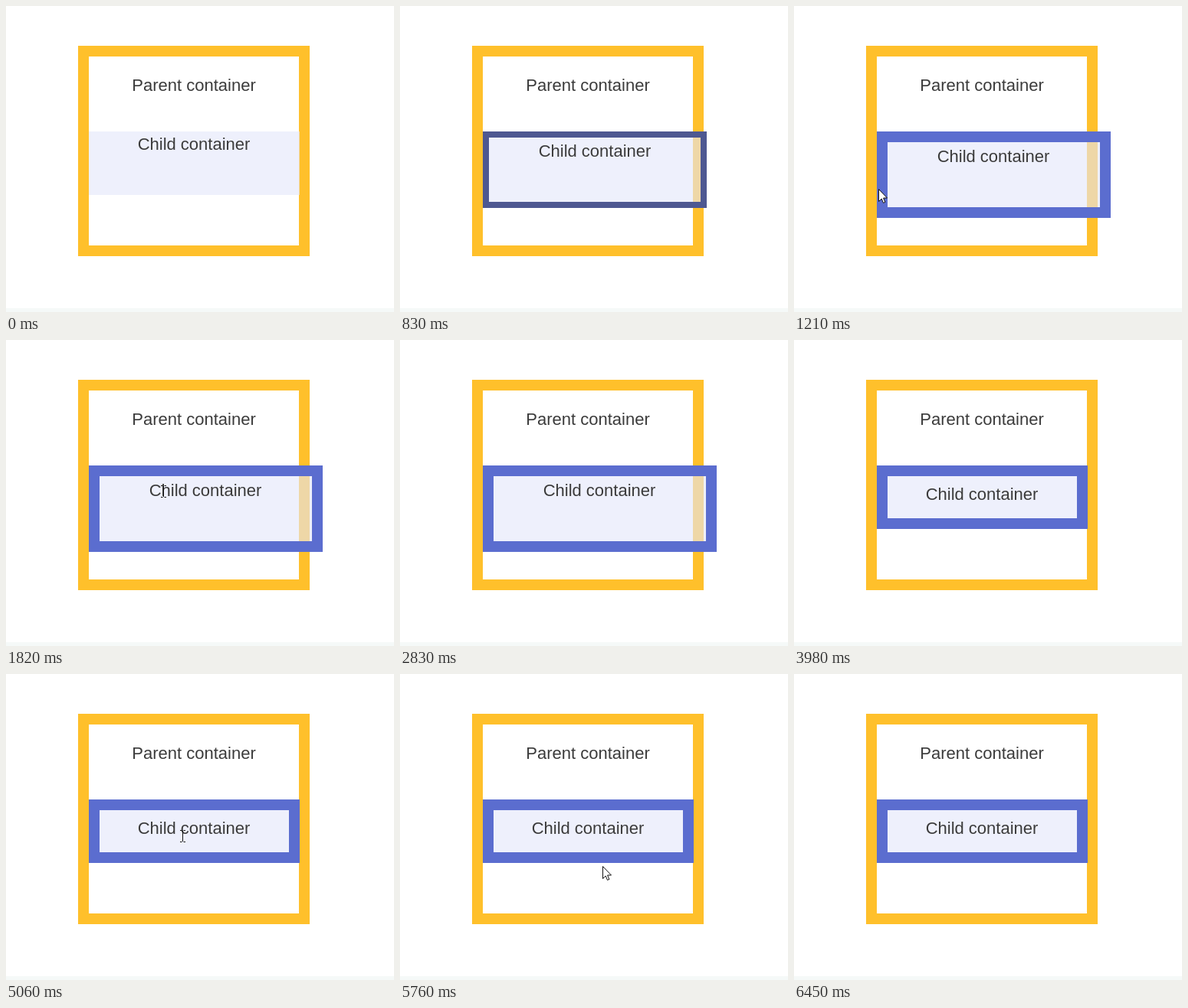
These frames come from a looping animation (506x400 px, 8.85 s). An HTML page with a canvas:

```html
<!DOCTYPE html>
<html lang="en">
<head>
<meta charset="utf-8">
<title>Box sizing</title>
<style>
  html, body { margin: 0; width: 100%; height: 100%; overflow: hidden; background: #fff; }
  canvas { display: block; }
</style>
</head>
<body>
<canvas id="stage" width="506" height="400"></canvas>
<script>
const ctx = document.getElementById('stage').getContext('2d');
const LOOP = 8850, TICK = 77, START = 664;
const GROWTH = [0.05, 0.25, 0.58, 1];
const INK = [59, 59, 59], BLUE = [91, 109, 207];

// Pointer paths: [tick, x, y]
const PATHS = [
  [[6, 36, 256], [10, 330, 186], [15, 205, 198], [17, 218, 200],
   [19, 240, 236], [21, 260, 199], [22, 260, 199], [27, 248, 373]],
  [[52, 50, 274], [57, 230, 212], [60, 298, 168], [63, 190, 200], [74, 463, 388]]
];
const ARROW = new Path2D('M.5 .5V16.5L4.2 13 6.5 18.4 8.9 17.4 6.6 12H11.5Z');
const BEAM = new Path2D('M-3.5 -7.5H-1M1 -7.5H3.5M0 -7V7M-3.5 7.5H-1M1 7.5H3.5');

const mix = (a, b, p) => a + (b - a) * p;

function rect(color, x, y, w, h) {
  ctx.fillStyle = color;
  ctx.fillRect(x, y, w, h);
}

function frame(color, x, y, w, h, b) {
  ctx.strokeStyle = color;
  ctx.lineWidth = b;
  ctx.strokeRect(x + b / 2, y + b / 2, w - b, h - b);
}

function label(text, x, y) {
  ctx.fillStyle = '#3b3b3b';
  ctx.fillText(text, x, y);
}

function pointerAt(tick) {
  for (const path of PATHS) {
    for (let i = 1; i < path.length; i++) {
      const [t0, x0, y0] = path[i - 1], [t1, x1, y1] = path[i];
      if (tick < t0 || tick > t1) continue;
      const p = (tick - t0) / (t1 - t0);
      return [Math.round(mix(x0, x1, p)), Math.round(mix(y0, y1, p))];
    }
  }
}

function drawPointer([x, y], textX, baseline) {
  const overText = Math.abs(x - textX) < 74 && y > baseline - 20 && y < baseline + 6;
  ctx.save();
  ctx.lineWidth = 1;
  ctx.strokeStyle = '#111';
  ctx.fillStyle = '#fff';
  if (overText) {
    ctx.translate(x + 0.5, y);
    ctx.stroke(BEAM);
  } else {
    ctx.translate(x, y);
    ctx.fill(ARROW);
    ctx.stroke(ARROW);
  }
  ctx.restore();
}

function draw(tick) {
  const grow = tick < 0 ? 0 : GROWTH[Math.min(tick, 3)];
  const borderBox = tick >= 39;
  const extra = borderBox ? 0 : 15 * grow;
  const width = Math.round(275 + 2 * extra), height = Math.round(83 + 2 * extra);
  const border = Math.round(14 * grow);
  const p = Math.min(Math.max((tick - 39) / 4, 0), 1);
  const textX = 245 + Math.round(extra);
  const baseline = Math.round(188 + 16 * grow + 5 * p * p * (3 - 2 * p));

  rect('#fff', 0, 0, 506, 400);
  rect('#f5f9f8', 0, 395, 506, 5);
  frame('#ffc02b', 94, 52, 302, 275, 14);
  rect('rgba(227,230,250,.6)', 108, 164, width, height);
  if (border) {
    const color = INK.map((c, i) => Math.round(mix(c, BLUE[i], grow)));
    frame(`rgb(${color})`, 108, 164, width, height, border);
  }

  ctx.font = '22px Arial, "Liberation Sans", sans-serif';
  ctx.textAlign = 'center';
  label('Parent container', 245, 111);
  label('Child container', textX, baseline);

  const pointer = pointerAt(tick);
  if (pointer) drawPointer(pointer, textX, baseline);
}

const begin = performance.now();
function play() {
  const time = (performance.now() - begin) % LOOP;
  draw(Math.floor((time - START) / TICK));
  requestAnimationFrame(play);
}
play();
</script>
</body>
</html>
```
